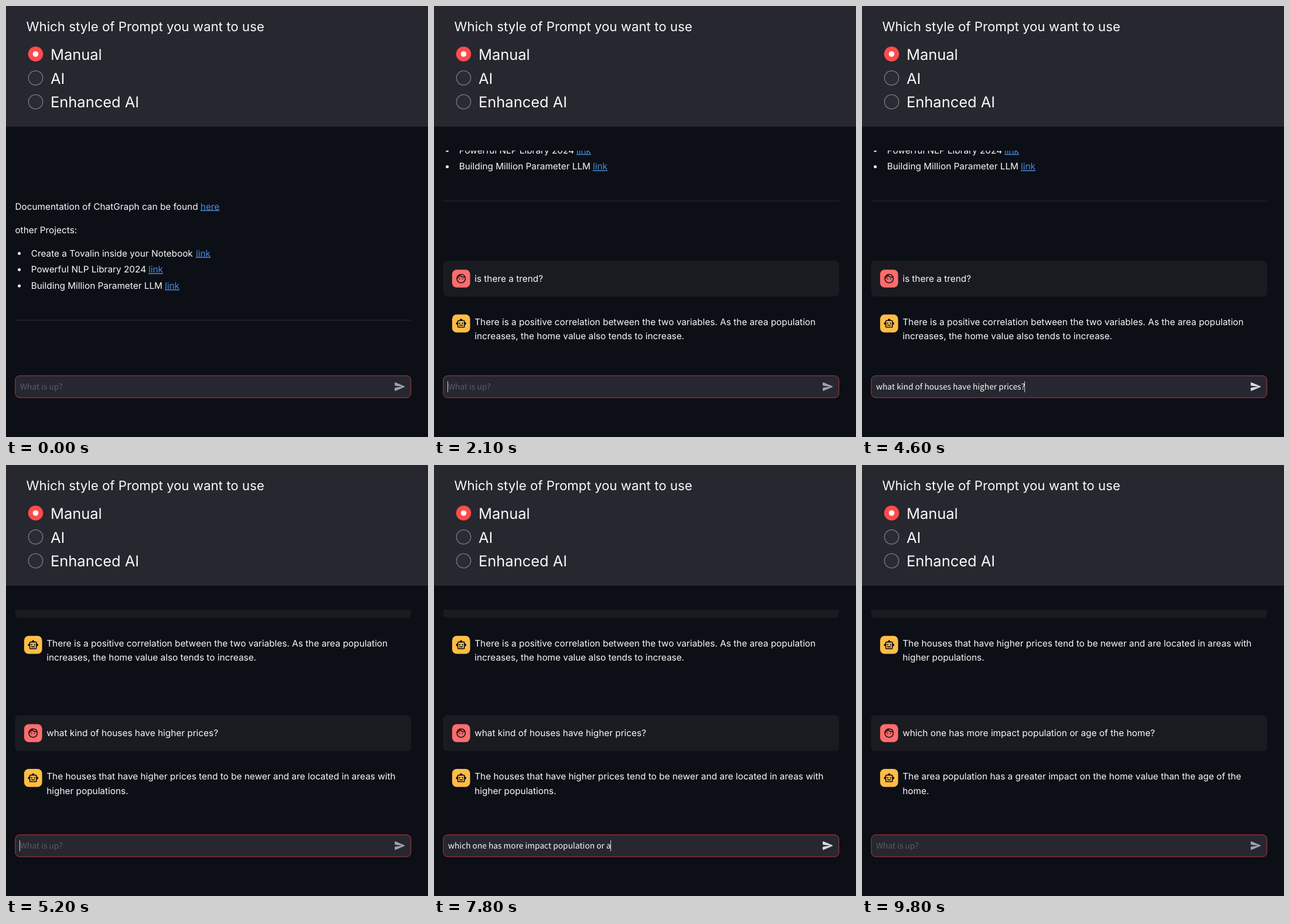
Write an HTML page that moves like this. It is 720 by 736 pixels and loops after 9.9 s.

```html
<!DOCTYPE html>
<html lang="en">
<head>
<meta charset="utf-8">
<title>Chat demo</title>
<style>
  html, body { margin: 0; height: 100%; overflow: hidden; background: #0c0f16; }
  svg { display: block; width: 720px; height: 736px; font: 15.36px Inter, sans-serif; font-optical-sizing: none; text-rendering: geometricPrecision; fill: #fafafa; }
  text { white-space: pre; }
  .link { fill: #4a8ad8; text-decoration: underline; }
  .field { font: 13.75px "Noto Sans CJK JP", "Noto Sans CJK SC", "Noto Sans CJK", sans-serif; }
</style>
</head>
<body>
<svg viewBox="0 0 720 736">
  <defs>
    <clipPath id="view"><rect y="247" width="720" height="375"/></clipPath>
    <path id="face" fill-rule="evenodd" d="M9 11.75a1.25 1.25 0 100 2.5 1.25 1.25 0 000-2.5zm6 0a1.25 1.25 0 100 2.5 1.25 1.25 0 000-2.5zM22 12c0 5.52-4.48 10-10 10S2 17.52 2 12 6.48 2 12 2s10 4.48 10 10zM10.66 4.12C12.06 6.44 14.6 8 17.5 8c.46 0 .91-.05 1.34-.12C17.44 5.56 14.9 4 12 4c-.46 0-.91.05-1.34.12zM4.42 9.47c1.71-.97 3.03-2.55 3.66-4.44C6.37 6 5.05 7.58 4.42 9.47zM20 12c0-.78-.12-1.53-.33-2.24-.7.15-1.42.24-2.17.24-3.13 0-5.92-1.44-7.76-3.69C8.69 8.87 6.6 10.88 4 11.86V12c0 4.41 3.59 8 8 8s8-3.59 8-8z"/>
    <path id="bot" d="M20 9V7c0-1.1-.9-2-2-2h-3c0-1.66-1.34-3-3-3S9 3.34 9 5H6c-1.1 0-2 .9-2 2v2c-1.66 0-3 1.34-3 3s1.34 3 3 3v4c0 1.1.9 2 2 2h12c1.1 0 2-.9 2-2v-4c1.66 0 3-1.34 3-3s-1.34-3-3-3zm-2 10H6V7h12v12zM9 13a1.5 1.5 0 110-3 1.5 1.5 0 010 3zm6 0a1.5 1.5 0 110-3 1.5 1.5 0 010 3zM8 15h8v2H8z"/>
  </defs>

  <rect width="720" height="206" fill="#26272f"/>
  <text x="34.6" y="43" font-size="22.26">Which style of Prompt you want to use</text>
  <g id="options" font-size="25.45"></g>

  <g clip-path="url(#view)"><g id="page">
    <g id="docs"></g>
    <path d="M15.4 536.5H691.2" stroke="#2a2c34"/>
    <g id="chat"></g>
  </g></g>

  <g id="running" fill="#74767d">
    <path transform="translate(647.3 213)" d="M13.49 5.48c1.1 0 2-.9 2-2s-.9-2-2-2-2 .9-2 2 .9 2 2 2zm-3.6 13.9l1-4.4 2.1 2v6h2v-7.5l-2.1-2 .6-3c1.3 1.5 3.3 2.5 5.5 2.5v-2c-1.9 0-3.5-1-4.3-2.4l-1-1.6c-.4-.6-1-1-1.7-1-.3 0-.5.1-.8.1l-5.2 2.2v4.7h2v-3.4l1.8-.7-1.6 8.1-4.9-1-.4 2 7 1.4z"/>
    <text x="679" y="230.5" font-size="13.44" fill="#9c9da4">RUNNING...</text>
  </g>

  <rect x="15.9" y="631.4" width="674.9" height="37.5" rx="7.5" fill="#262730" stroke="#b8393e"/>
  <text id="field" class="field" x="24" y="655"></text>
  <path id="caret" d="M.5 641V659.5" stroke="#d5d6da"/>
  <path id="send" transform="translate(661.5 639.6) scale(.87)" d="M3.4 20.4l17.45-7.48c.81-.35.81-1.49 0-1.84L3.4 3.6c-.66-.29-1.39.2-1.39.91L2 9.12c0 .5.37.93.87.99L17 12 2.87 13.88c-.5.07-.87.5-.87 1l.01 4.61c0 .71.73 1.2 1.39.91z"/>
</svg>
<script>
const LOOP = 9900, STEP = 100, FIRST_Y = 669, PITCH = 227.2, WAIT_OFFSET = 18;

// Times in ms: typing starts, delay per key, message sent, reply shown.
const exchanges = [
  { ask: "is there a trend?",
    reply: ["There is a positive correlation between the two variables. As the area population",
            "increases, the home value also tends to increase."],
    start: 100, key: 45, sent: 1000, answered: 1600, scroll: 203.5 },
  { ask: "what kind of houses have higher prices?",
    reply: ["The houses that have higher prices tend to be newer and are located in areas with",
            "higher populations."],
    start: 2880, key: 44, sent: 4700, answered: 5100, scroll: 438.4 },
  { ask: "which one has more impact population or age of the home?",
    reply: ["The area population has a greater impact on the home value than the age of the",
            "home."],
    start: 6640, key: 28, sent: 8300, answered: 9500, scroll: 665.6 }
];

const $ = id => document.getElementById(id);
const show = (el, on) => el.setAttribute("visibility", on ? "visible" : "hidden");
const text = (x, y, s, cls = "") => `<text x="${x}" y="${y}" class="${cls}">${s}</text>`;

const avatar = (icon, y, color) => `
  <rect x="30.9" y="${y - 15.36}" width="30.7" height="30.7" rx="7.7" fill="${color}"/>
  <use href="#${icon}" transform="translate(36.65 ${y - 9.6}) scale(.8)" fill="#11131a"/>`;

$("options").innerHTML = ["Manual", "AI", "Enhanced AI"].map((label, i) => {
  const y = 82 + i * 40.8;
  const dot = i
    ? `<circle cx="50.5" cy="${y}" r="12.2" fill="#2a2b33" stroke="#7b7c83" stroke-width="1.3"/>`
    : `<circle cx="50.5" cy="${y}" r="12.8" fill="#ff4b4b"/><circle cx="50.5" cy="${y}" r="4.8"/>`;
  return dot + text(76, y + 9.8, label);
}).join("");

const projects = [
  ["Create a Tovalin inside your Notebook", 324],
  ["Powerful NLP Library 2024", 243],
  ["Building Million Parameter LLM", 271]
];
$("docs").innerHTML =
  text(15.4, 347.5, "Documentation of ChatGraph can be found") + text(331.8, 347.5, "here", "link") +
  text(15.4, 387.5, "other Projects:") +
  projects.map(([name, linkX], i) => {
    const y = 427.5 + i * 27.7;
    return `<circle cx="22.6" cy="${y - 5}" r="2.5"/>` + text(42.7, y, name) + text(linkX, y, "link", "link");
  }).join("");

$("chat").innerHTML = exchanges.map(({ ask, reply }, i) => {
  const y = FIRST_Y + i * PITCH, botY = y + 76.6;
  return `<g display="none">
    <rect x="15.4" y="${y - 30.7}" width="675.8" height="61.4" rx="7.5" fill="#191b21"/>
    ${avatar("face", y, "#ff6c6c")}${text(69.2, y + 5.4, ask)}
    ${avatar("bot", botY, "#ffbd45")}
    <g>${reply.map((line, n) => text(69.2, botY + 2.7 + n * 24.58, line)).join("")}</g>
    <g transform="translate(79.6 ${botY - 0.6})" fill="none" stroke-width="2.6">
      <circle r="9.2" stroke="#363941"/>
      <path d="M-6.5 -6.5A9.2 9.2 0 0 1 6.5 -6.5" stroke="#3f86dc"/>
    </g>
  </g>`;
}).join("");

function render(t) {
  let scroll = 0, typed = "", running = false;
  exchanges.forEach((e, i) => {
    const group = $("chat").children[i];
    const [reply, spinner] = [...group.children].slice(-2);
    const sent = t >= e.sent, answered = t >= e.answered;
    group.setAttribute("display", sent ? "inline" : "none");
    show(reply, answered);
    show(spinner, !answered);
    spinner.lastElementChild.setAttribute("transform", `rotate(${(t - 8600) / 750 * 360})`);
    if (sent) scroll = e.scroll - (answered ? 0 : WAIT_OFFSET);
    else if (t >= e.start) typed = e.ask.slice(0, Math.floor((t - e.start) / e.key));
    running ||= sent && t < e.answered + STEP;
  });
  $("page").setAttribute("transform", `translate(0 ${-scroll})`);
  show($("running"), running);

  const field = $("field");
  field.textContent = typed || "What is up?";
  field.setAttribute("fill", typed ? "#fafafa" : "#5b5c65");
  $("send").setAttribute("fill", typed ? "#d9dae2" : "#a0a2b0");
  const caretX = typed ? 24 + field.getComputedTextLength() : 23.5;
  $("caret").setAttribute("transform", `translate(${Math.round(caretX - .5)} 0)`);
  show($("caret"), typed || (t + 450) % 500 < 250);
}

const begin = performance.now();
(function tick() {
  const t = (performance.now() - begin) % LOOP;
  render(Math.floor(t / STEP) * STEP);
  requestAnimationFrame(tick);
})();
</script>
</body>
</html>
```
